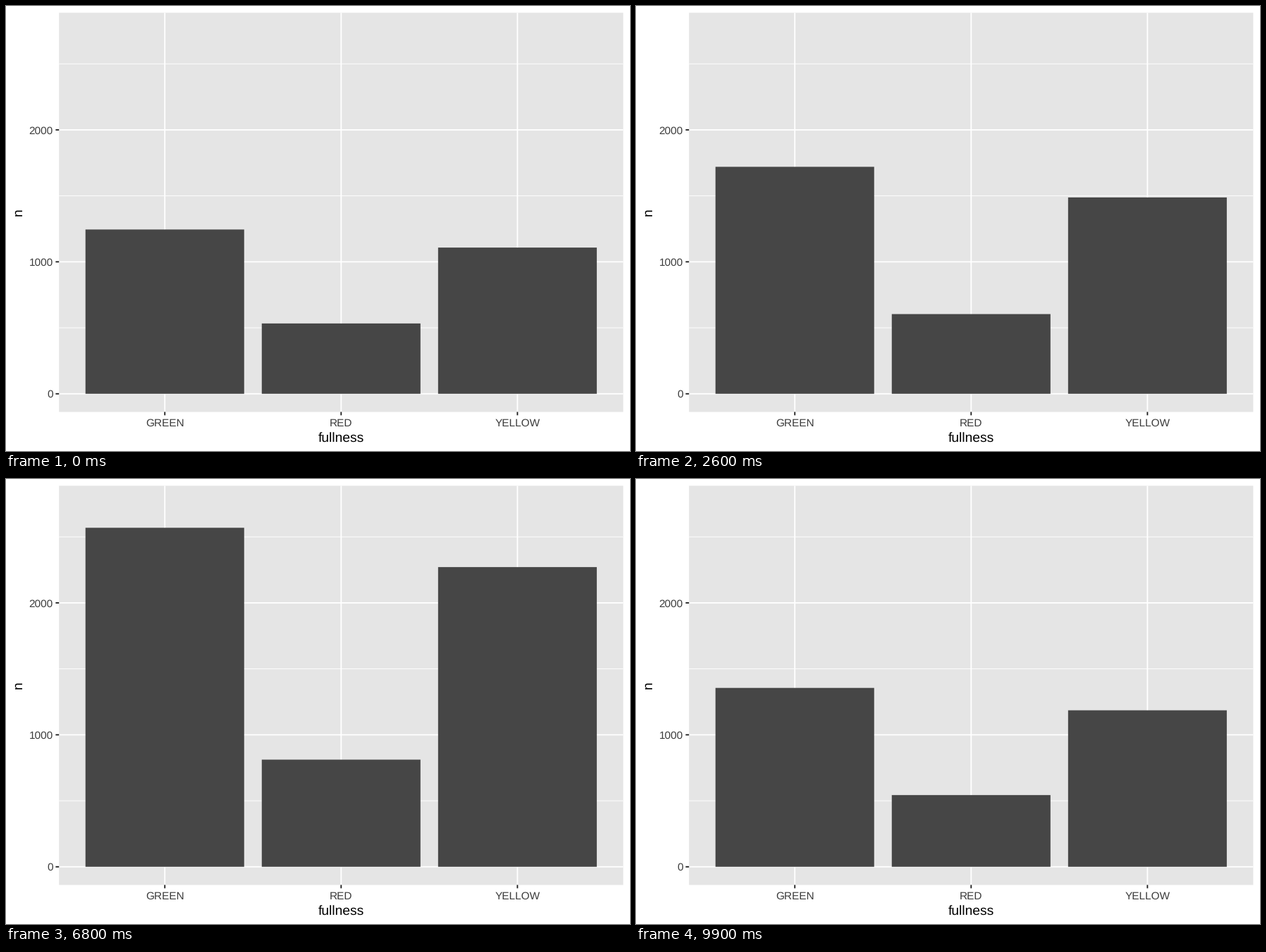
Animation of 885 by 632 pixels, one loop 10 s. Source, as a matplotlib script:

```python
import matplotlib.pyplot as plt
from matplotlib.animation import FuncAnimation
from matplotlib.patches import Rectangle

plt.rcParams["font.family"] = "Liberation Sans"
plt.rcParams["text.hinting"] = "none"

W, H, DPI = 885, 632, 100
FRAMES, INTERVAL = 100, 100
PX = 72 / DPI  # points per pixel

LEFT, RIGHT, TOP, BOTTOM = 75.2, 875.4, 9.6, 576.5
ZERO, SCALE = 550.75, 0.18742
UNIT = (RIGHT - LEFT) / 3.2
MAJOR, MINOR = 1.87, 0.94
TICK = 4.8

LABELS = ["GREEN", "RED", "YELLOW"]
COUNTS = [
    (1245, 533, 1108),
    (1180, 482, 1045),
    (1530, 533, 1290),
    (1720, 604, 1488),
    (2036, 623, 1811),
    (2360, 626, 2110),
    (2524, 729, 2264),
    (2750, 796, 2445),
    (2569, 812, 2271),
    (2168, 706, 1875),
    (1715, 658, 1439),
    (1687, 575, 1419),
]
# first moving frame of each change; a change takes four steps
STARTS = [5, 14, 23, 32, 41, 49, 57, 65, 73, 81, 89, 97]
STEPS = 4

fig = plt.figure(figsize=(W / DPI, H / DPI), dpi=DPI, facecolor="white")
ax = fig.add_axes([0, 0, 1, 1])
ax.set_xlim(0, W)
ax.set_ylim(H, 0)
ax.axis("off")


def to_y(n):
    return ZERO - n * SCALE


def box(x, y, w, h, color, z):
    patch = Rectangle((x, y), w, h, fc=color, lw=0, ec="none", zorder=z)
    patch.set_snap(False)
    return ax.add_patch(patch)


def line(x0, y0, x1, y1, color, width, z):
    ax.plot([x0, x1], [y0, y1], color=color, lw=width * PX, zorder=z,
            solid_capstyle="butt", snap=False)


def text(x, y, s, size, color, **kw):
    ax.text(x, y, s, fontsize=size * PX, color=color, **kw)


box(LEFT, TOP, RIGHT - LEFT, BOTTOM - TOP, "#e5e5e5", 0)

for n in (500, 1500, 2500):
    line(LEFT, to_y(n), RIGHT, to_y(n), "white", MINOR, 1)

for n in (0, 1000, 2000):
    y = to_y(n)
    line(LEFT, y, RIGHT, y, "white", MAJOR, 2)
    line(LEFT - TICK, y, LEFT, y, "#222222", MAJOR, 4)
    text(66.6, y + 5.5, str(n), 15.4, "#3c3c3c", ha="right", va="baseline")

bars = []
for i, label in enumerate(LABELS):
    x = LEFT + (0.6 + i) * UNIT
    line(x, TOP, x, BOTTOM, "white", MAJOR, 2)
    line(x, BOTTOM, x, BOTTOM + TICK, "#222222", MAJOR, 4)
    text(x, 596.6, label, 15.4, "#3c3c3c", ha="center", va="baseline")
    bars.append(box(x - 0.45 * UNIT, ZERO, 0.9 * UNIT, 0, "#464646", 3))

text((LEFT + RIGHT) / 2, 618.7, "fullness", 19.25, "black",
     ha="center", va="baseline")
text(22.6, (TOP + BOTTOM) / 2, "n", 19.25, "black", rotation=90,
     rotation_mode="anchor", ha="center", va="baseline")


def counts_at(frame):
    done = sum(frame >= s for s in STARTS)
    if done == 0:
        return COUNTS[0]
    t = min((frame - STARTS[done - 1] + 1) / STEPS, 1)
    a, b = COUNTS[done - 1], COUNTS[done % len(COUNTS)]
    return [p + (q - p) * t for p, q in zip(a, b)]


def update(frame):
    for bar, n in zip(bars, counts_at(frame)):
        bar.set_y(to_y(n))
        bar.set_height(n * SCALE)
    return bars


anim = FuncAnimation(fig, update, frames=FRAMES, interval=INTERVAL,
                     repeat=True, repeat_delay=0, blit=False)
plt.show()
```
